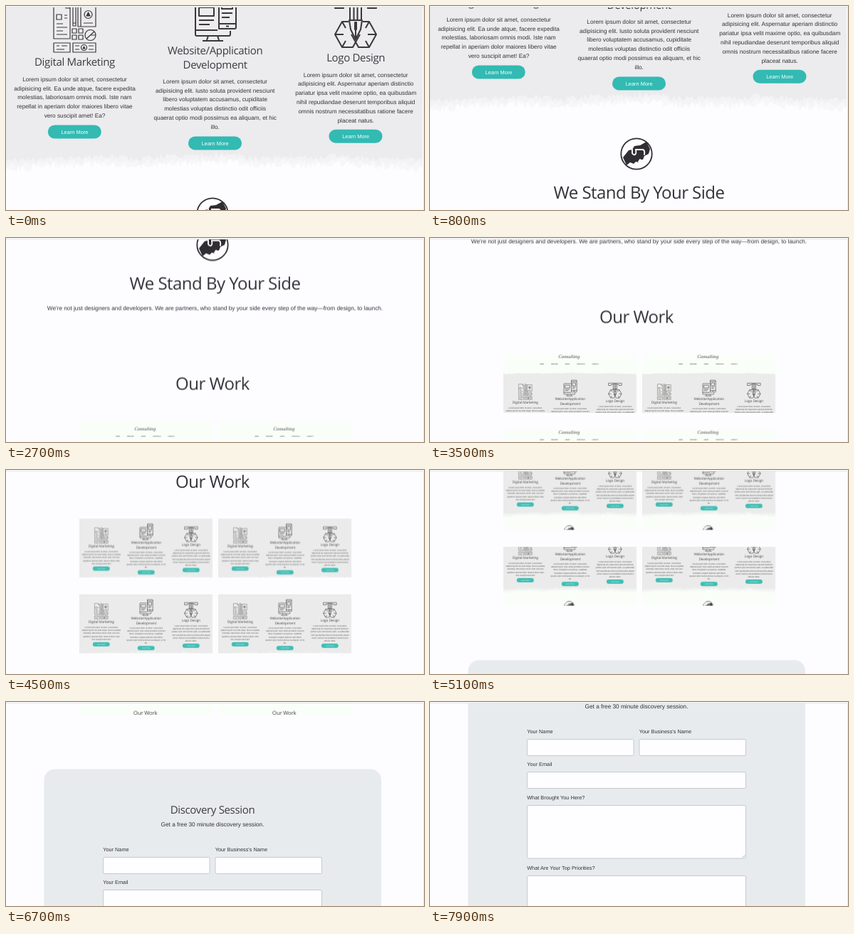
Recreate the animation shown at these times as an HTML page. Size 587 px wide and 287 px high, loop 8000 ms.

```html
<!DOCTYPE html>
<html lang="en">
<head>
<meta charset="utf-8">
<title>Scrolling agency page</title>
<style>
  html, body { margin: 0; width: 100%; height: 100%; overflow: hidden; background: #fdfcff; }
  svg { display: block; }
  text { text-rendering: geometricPrecision; }
  .body { font: 8.25px "Liberation Sans", Arial, sans-serif; fill: #343337; }
  .mid, .head, .btn { text-anchor: middle; }
  .head { font: 15px "Open Sans", "Noto Sans", sans-serif; letter-spacing: -.022em; fill: #3c3b40; }
  .big { font-size: 24px; fill: #333237; }
  .btn { font: 7.45px "Liberation Sans", Arial, sans-serif; fill: #fff; }
  .label { font: 7.35px "Liberation Sans", Arial, sans-serif; fill: #333; }
  .brand { font: italic 21.4px "Liberation Serif", Times, serif; fill: #3c3c3c; }
  .nav { font: bold 6px "Liberation Sans", Arial, sans-serif; fill: #333; }
  .icon { fill: none; stroke: #3b383c; stroke-width: 1.2; stroke-linejoin: round; }
  .bold { stroke-width: 2; }
  .icon .solid { fill: #3b383c; }
  .icon .paper { fill: #ecebed; }
  .field { fill: #fefdff; stroke: #c6cacd; stroke-width: 1; }

  #page { animation: scroll 8s -20ms infinite; }
  .preview { animation: preview 8s -20ms infinite; }

  @keyframes scroll {
    0%     { transform: translateY(0);        animation-timing-function: steps(18); }
    22.5%  { transform: translateY(-189px);   animation-timing-function: steps(6); }
    30%    { transform: translateY(-259px);   animation-timing-function: steps(1); }
    31.25% { transform: translateY(-259px);   animation-timing-function: steps(10); }
    43.75% { transform: translateY(-376.5px); animation-timing-function: steps(10); }
    56.25% { transform: translateY(-471px);   animation-timing-function: steps(13); }
    72.5%  { transform: translateY(-616px);   animation-timing-function: steps(9); }
    83.75% { transform: translateY(-711px);   animation-timing-function: steps(12); }
    98.75%, 100% { transform: translateY(-877px); }
  }
  @keyframes preview {
    0%, 40% { transform: translateY(160px);  animation-timing-function: steps(3); }
    43.75%  { transform: translateY(136px);  animation-timing-function: steps(10); }
    56.25%  { transform: translateY(43px);   animation-timing-function: steps(13); }
    72.5%   { transform: translateY(-115px); animation-timing-function: steps(9); }
    83.75%  { transform: translateY(-236px); animation-timing-function: steps(13); }
    100%    { transform: translateY(-400px); }
  }
</style>
</head>
<body>
<svg width="587" height="287" viewBox="0 0 587 287">
  <g id="page">
    <g id="site">
      <text class="brand mid" x="289" y="-117">Consulting</text>
      <g id="nav"></g>
      <g id="band"></g>

      <g class="icon">
        <path d="M67 3V46H90V3L84 -3H67ZM84 -3V3H90M71 12H78V19H71ZM82 13H86M82 17H86M71 25H80M71 30H86M71 35H80M71 40H86"/>
        <path d="M94 -1 96 -5 98 -1V28H94ZM94 24H98"/>
        <path d="M101 0H126V29H101ZM105 0V29M109 24H122"/>
        <circle cx="115.500" cy="12" r="5.500"/><path class="solid" d="M113 14 115.500 9 118 14Z"/>
        <path d="M93 32H99V38H93ZM102 32H108V38H102ZM93 41H99V47H93ZM102 41H108V47H102Z"/>
        <circle cx="118.500" cy="41" r="7.500"/><path d="M118.500 41 124 36M118.500 41H126M118.500 41 113 46"/>
        <path d="M67 52H90V65H67ZM71 56H75M78 56H86M71 61H82M94 52H126V65H94ZM97 56H103M97 61H103M116 56H123M116 61H123"/>
        <circle cx="109.500" cy="58.500" r="4"/><path class="solid" d="M108 60 109.500 57 111 60Z"/>
      </g>

      <g class="icon bold">
        <path d="M297 -5H268Q266 -5 266 -3V40Q266 42 268 42H313Q315 42 315 40V35M266 34H297M284 42 282 48M297 42 299 48M276 49H305"/>
        <path d="M271 2H292V14H271ZM271 20H292M271 26H286"/>
        <path class="paper" d="M299 -20H321Q323 -20 323 -18V30Q323 32 321 32H299ZM299 -14H323M299 25H323"/>
        <path d="M303 -8H318V4H303ZM303 10H318M303 16H314M309 28.500H313"/>
      </g>

      <g class="icon bold">
        <path d="M462 -7H520V3H508V-1H474V3H462Z"/>
        <path d="M481 22H472L462 40 472 58H487L497 40M462 40H474M472 22 477 31M472 58 477 49"/>
        <path d="M501 22H510L520 40 510 58H495L485 40M520 40H508M510 22 505 31M510 58 505 49"/>
        <path class="paper" d="M483 -4H499V20H483ZM482 20H500L498 33 491 47 484 33Z"/>
        <path d="M488.500 -4V20M493.500 -4V20M491 34V46"/>
        <path class="solid" d="M490 23H492V33H490Z"/>
      </g>

      <g id="services"></g>

      <g transform="translate(290 292)">
        <circle r="21.700" fill="#fdfcff" stroke="#302e32" stroke-width="1.800"/>
        <path fill="#302e32" d="M-19 5-11-5-6-6-3-11 5-12 14-17 19-7 17 0 11 3 9 8 5 8 3 12-1 11-4 14-9 12-14 16Z"/>
        <path fill="none" stroke="#fdfcff" stroke-width="1.900" stroke-linecap="round" d="M-6-6V-1Q-5 2-2 1Q0 0-1-6H9Q12-5 11 1M3 11 5 8"/>
      </g>
      <text class="head big" x="293.500" y="355">We Stand By Your Side</text>
      <text class="body mid" x="293.500" y="384">We're not just designers and developers. We are partners, who stand by your side every step of the way—from design, to launch.</text>
      <text class="head big" x="290" y="495.500">Our Work</text>
    </g>

    <g id="work"></g>

    <rect x="53.500" y="805.500" width="473.500" height="500" rx="15" fill="#e7ebee"/>
    <text class="head" x="290" y="868">Discovery Session</text>
    <text class="body mid" x="290" y="886.300">Get a free 30 minute discovery session.</text>
    <g id="form"></g>
  </g>
  <path d="M0 .5H587" stroke="#fdfcff"/>
  <path d="M0 1.500H587M586.500 1V287" stroke="#e6e5ea" fill="none"/>
</svg>

<script>
  const NS = 'http://www.w3.org/2000/svg';

  function add(parent, tag, attrs, text) {
    const el = document.createElementNS(NS, tag);
    for (const key in attrs) el.setAttribute(key, attrs[key]);
    if (text) el.textContent = text;
    parent.appendChild(el);
    return el;
  }
  const byId = id => document.getElementById(id);

  let seed = 11;
  function random() {
    seed = (seed * 16807) % 2147483647;
    return seed / 2147483647;
  }

  // Grey band with brushed edges, built from stacked translucent layers.
  function brushEdge(y, rough) {
    const points = [];
    for (let x = 0; x <= 587; x += 2.5) {
      const wave = Math.sin(x / 13) + 1.5 * Math.sin(x / 29 + 1) + 2 * Math.cos(x / 94);
      points.push(`${x} ${(y + wave * rough / 8 + (random() - .5) * rough).toFixed(1)}`);
    }
    return points;
  }
  function addLayer(bottom, top, rough, opacity) {
    const upper = brushEdge(top, rough * .6);
    const lower = brushEdge(bottom, rough).reverse();
    add(byId('band'), 'path', { d: `M${upper.concat(lower).join('L')}Z`, fill: '#ecebed', opacity });
  }
  addLayer(224, -51, 10, .3);
  addLayer(219, -50, 9, .4);
  addLayer(213, -49, 8, 1);

  [['HOME', 169], ['SERVICES', 225], ['ABOUT', 282], ['PORTFOLIO', 341], ['CONTACT', 404]]
    .forEach(([name, x]) => add(byId('nav'), 'text', { class: 'nav mid', x, y: -89 }, name));

  const services = [
    { x: 96.5, title: ['Digital Marketing'], titleY: 84.3, textY: 105.7, buttonY: 177, lines: [
      'Lorem ipsum dolor sit amet, consectetur',
      'adipisicing elit. Ea unde atque, facere expedita',
      'molestias, laboriosam omnis modi. Iste nam',
      'repellat in aperiam dolor maiores libero vitae',
      'vero suscipit amet! Ea?'] },
    { x: 293.7, title: ['Website/Application', 'Development'], titleY: 68.2, textY: 108.7, buttonY: 193, lines: [
      'Lorem ipsum dolor sit amet, consectetur',
      'adipisicing elit. Iusto soluta provident nesciunt',
      'libero voluptatem accusamus, cupiditate',
      'molestias voluptas distinctio odit officiis',
      'quaerat optio modi possimus ea aliquam, et hic',
      'illo.'] },
    { x: 491.2, title: ['Logo Design'], titleY: 78, textY: 99.5, buttonY: 183.3, lines: [
      'Lorem ipsum dolor sit amet, consectetur',
      'adipisicing elit. Aspernatur aperiam distinctio',
      'pariatur ipsa velit maxime optio, ea quibusdam',
      'nihil repudiandae deserunt temporibus aliquid',
      'omnis nostrum necessitatibus ratione facere',
      'placeat natus.'] }
  ];
  services.forEach(({ x, title, titleY, textY, buttonY, lines }) => {
    const box = byId('services');
    title.forEach((t, i) => add(box, 'text', { class: 'head', x, y: titleY + i * 20 }, t));
    lines.forEach((t, i) => add(box, 'text', { class: 'body mid', x, y: textY + i * 12.8 }, t));
    add(box, 'rect', { x: x - 37.7, y: buttonY - 9.5, width: 75, height: 19, rx: 9.5, fill: '#32bab3' });
    add(box, 'text', { class: 'btn', x, y: buttonY + 2.6 }, 'Learn More');
  });

  // Portfolio cards: small copies of the site that scroll on their own.
  for (const y of [539.5, 646]) {
    for (const x of [103, 298]) {
      const area = { x, y, width: 187.5, height: 83 };
      add(byId('work'), 'rect', { ...area, fill: '#fdfffd' });
      const card = add(byId('work'), 'svg', { ...area, viewBox: '0 0 587 259.85' });
      add(card, 'use', { href: '#site', class: 'preview' });
      add(byId('work'), 'rect', { ...area, fill: '#d0f0c8', opacity: .08 });
    }
  }

  const fields = [
    ['Your Name', 136.5, 929.5, 149.5, 23],
    ["Your Business's Name", 294, 929.5, 149.5, 23],
    ['Your Email', 136.5, 975.5, 307, 23],
    ['What Brought You Here?', 136.5, 1022.5, 307, 74.5],
    ['What Are Your Top Priorities?', 136.5, 1121.5, 307, 74.5]
  ];
  fields.forEach(([name, x, y, width, height]) => {
    const form = byId('form');
    add(form, 'text', { class: 'label', x: x - .3, y: y - 9 }, name);
    add(form, 'rect', { class: 'field', x, y, width, height, rx: 1.5 });
    if (height > 50) {
      const right = x + width - 1, bottom = y + height - 1;
      add(form, 'path', { d: `M${right - 4} ${bottom}l4-4M${right - 2} ${bottom}l2-2`, stroke: '#999', 'stroke-width': .6 });
    }
  });
</script>
</body>
</html>
```
